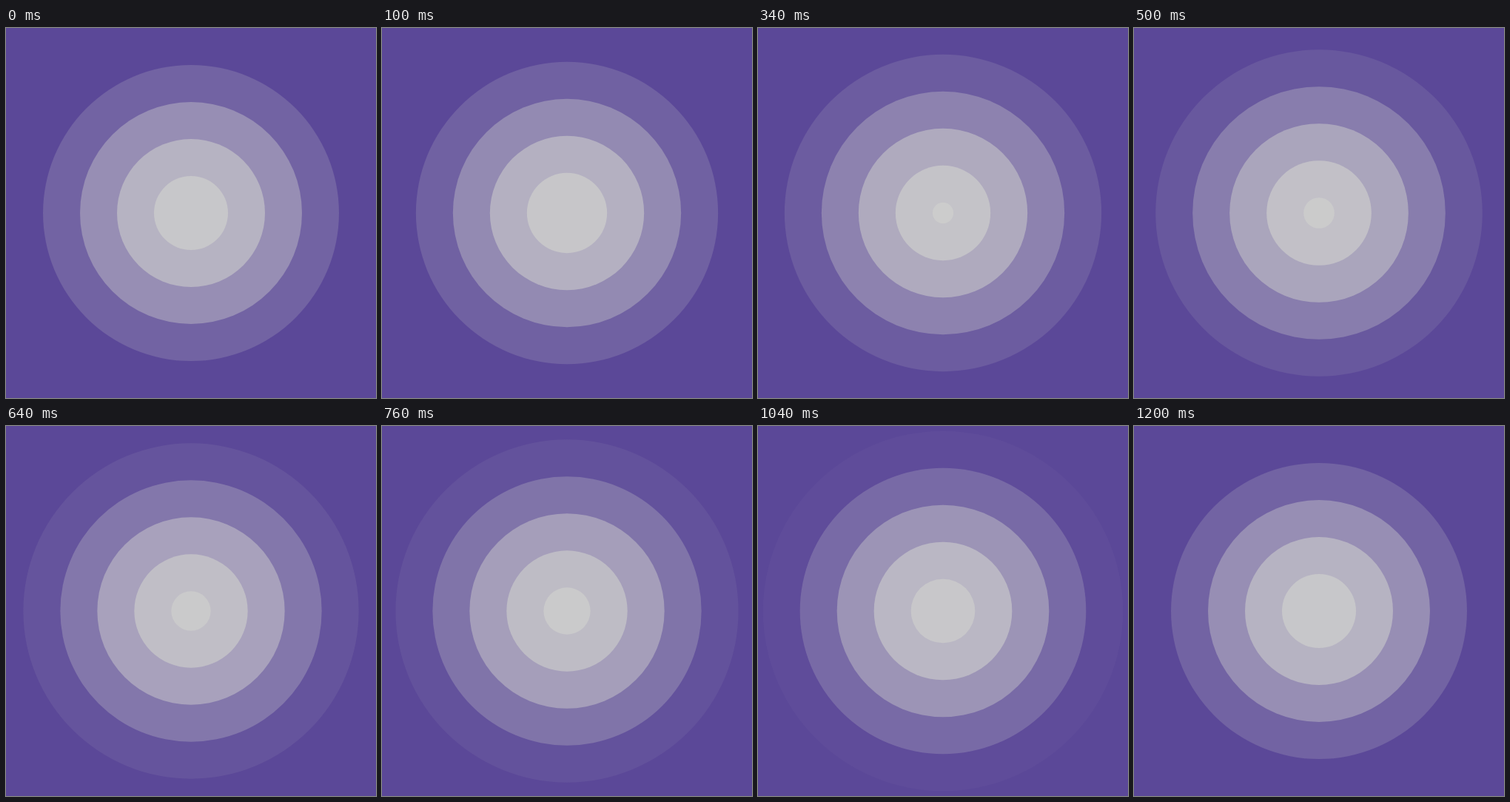
An HTML page with a canvas for the animation above (1220 ms loop, 500 by 500 pixels).

```html
<!DOCTYPE html>
<html lang="en">
<head>
<meta charset="utf-8">
<title>Ripples</title>
<style>
  html, body { margin: 0; width: 100%; height: 100%; overflow: hidden; background: #5b4898; }
  canvas { display: block; }
</style>
</head>
<body>
<canvas id="stage" width="500" height="500"></canvas>
<script>
const ctx = document.getElementById('stage').getContext('2d');
const LOOP = 1220;
const STEP = 20;
const TRAVEL = 1200;   // time to grow by one gap
const GAP = 50;
const MAX_RADIUS = 250;
const RINGS = 5;
const MIN_RADIUS = 11; // a newborn ripple stays hidden below this

function drawRipple(radius) {
  if (radius < MIN_RADIUS || radius >= MAX_RADIUS) return;
  ctx.globalAlpha = 1 - radius / MAX_RADIUS;
  ctx.beginPath();
  ctx.arc(250, 250, radius, 0, Math.PI * 2);
  ctx.fill();
}

function draw(now) {
  const time = Math.floor((now % LOOP) / STEP) * STEP;
  ctx.globalAlpha = 1;
  ctx.fillStyle = '#5b4898';
  ctx.fillRect(0, 0, 500, 500);
  ctx.fillStyle = '#ccc';
  for (let ring = RINGS - 1; ring >= 0; ring--) {
    drawRipple(GAP * (ring + time / TRAVEL));
  }
}

let start;
function tick(now) {
  start ??= now;
  draw(now - start);
  requestAnimationFrame(tick);
}
draw(0);
requestAnimationFrame(tick);
</script>
</body>
</html>
```
